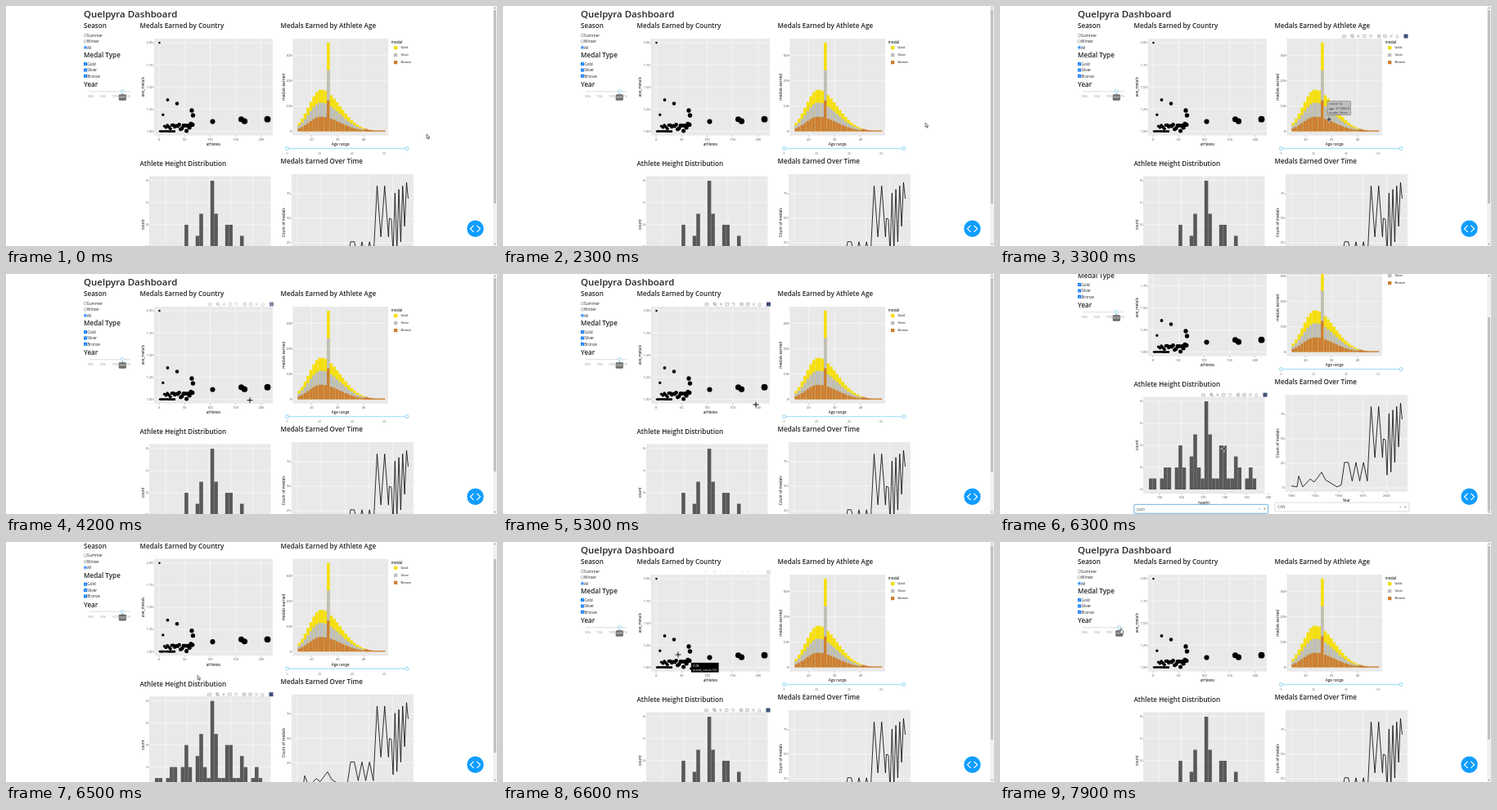
Recreate the animation shown at these times as an HTML page. Size 600 px wide and 294 px high, loop 8 s.

```html
<!DOCTYPE html>
<html lang="en">
<head>
<meta charset="utf-8">
<style>
  html, body { margin: 0; width: 100%; height: 100%; overflow: hidden; background: #fff; }
  svg { display: block; }
  text { font-family: "Open Sans", "Noto Sans", sans-serif; }
</style>
</head>
<body>
<svg id="stage" width="600" height="294" viewBox="0 0 600 294"></svg>
<script>
const LOOP = 8000, SCROLL = 58;
const stage = document.getElementById('stage');

function add(parent, name, attrs = {}) {
  const node = document.createElementNS('http://www.w3.org/2000/svg', name);
  for (const key in attrs) node.setAttribute(key, attrs[key]);
  parent.appendChild(node);
  return node;
}
const page = add(stage, 'g');
const group = (parent = page) => add(parent, 'g');
const rect = (x, y, width, height, fill, more = {}, parent = page) =>
  add(parent, 'rect', { x, y, width, height, fill, ...more });
const circle = (cx, cy, r, fill, more = {}, parent = page) =>
  add(parent, 'circle', { cx, cy, r, fill, ...more });
const path = (d, stroke, width, more = {}, parent = page) =>
  add(parent, 'path', { d, stroke, 'stroke-width': width, fill: 'none', ...more });
// y is the vertical middle of the capitals
function text(label, x, y, size, more = {}, parent = page) {
  const node = add(parent, 'text', { x, y: y + size * 0.36, 'font-size': size, fill: '#212529', ...more });
  node.textContent = label;
  return node;
}
const heading = (label, x, y, size = 8.15) => text(label, x, y, size, { 'font-weight': 600 });
const range = (count, make) => Array.from({ length: count }, (_, i) => make(i));

let seed = 7;
const random = () => (seed = seed * 16807 % 2147483647) / 2147483647;

// Sidebar
heading('Quelpyra Dashboard', 95, 9.5, 11.5);
heading('Season', 95, 24.5);
heading('Medal Type', 95, 60.5);
heading('Year', 95, 96);
['Summer', 'Winter', 'All'].forEach((label, i) => {
  const y = 36 + i * 7.4, on = label === 'All';
  circle(97, y, 1.8, '#fff', { stroke: on ? '#0075ff' : '#767676', 'stroke-width': 0.5 });
  if (on) circle(97, y, 1.1, '#0075ff');
  text(label, 99, y, 4.8);
});
['Gold', 'Silver', 'Bronze'].forEach((label, i) => {
  const y = 71 + i * 7.4;
  rect(95, y - 2, 4, 4, '#0075ff', { rx: 0.6 });
  path(`M95.9 ${y}l.8 .9 1.5-1.9`, '#fff', 0.6);
  text(label, 99.2, y, 4.8);
});
rect(101, 103.9, 51, 1.3, '#e4e4e4', { rx: 0.6 });
range(4, i => text(1896 + i * 40, 103 + i * 15, 111, 3.6, { fill: '#999', 'text-anchor': 'middle' }));
const yearKnob = group();
circle(0, 104.5, 1.9, '#fff', { stroke: '#74c9f3', 'stroke-width': 0.7 }, yearKnob);
path('M-1.2 108.4L0 107l1.2 1.4z', 'none', 0, { fill: '#6c6c6c' }, yearKnob);
rect(-4.6, 108.2, 9.2, 7.6, '#6c6c6c', { rx: 1.4 }, yearKnob);
const yearLabel = text('', 0, 112, 3.6, { fill: '#fff', 'text-anchor': 'middle' }, yearKnob);

// Chart frames; each tick is [label, position]
const panels = [];
function panel(x, y, w, h, xTicks, yTicks, xTitle, yTitle, yTitleX) {
  panels.push([x, y, w, h]);
  rect(x, y, w, h, '#e9e9e9');
  for (const [label, px] of xTicks) {
    path(`M${px} ${y}v${h}`, '#fff', 0.5);
    path(`M${px} ${y + h}v1.1`, '#333', 0.5);
    text(label, px, y + h + 4.6, 3.8, { fill: '#4d4d4d', 'text-anchor': 'middle' });
  }
  for (const [label, py] of yTicks) {
    path(`M${x} ${py}h${w}`, '#fff', 0.5);
    path(`M${x} ${py}h-1.1`, '#333', 0.5);
    text(label, x - 1.6, py, 3.8, { fill: '#4d4d4d', 'text-anchor': 'end' });
  }
  const title = { 'text-anchor': 'middle', fill: '#000' }, middle = y + h / 2;
  text(xTitle, x + w / 2, y + h + 11.2, 4.7, title);
  text(yTitle, yTitleX, middle, 4.7, { ...title, transform: `rotate(-90 ${yTitleX} ${middle})` });
}
const ticks = (count, value, position, valueStep, step, digits = 0) =>
  range(count, i => [(value + i * valueStep).toFixed(digits), position + i * step]);

// Scatter: a crowd near the origin plus the outliers, larger towards the right
heading('Medals Earned by Country', 163.5, 24.5);
panel(181, 40, 145, 118.6, ticks(5, 0, 187, 50, 31.2), ticks(5, 1, 153.5, 0.25, -27.1, 2),
  'athletes', 'ave_metals', 167);
const dot = (x, y) => circle(x, y, 1.1 + 2.8 * Math.sqrt((x - 187) / 132), '#000');
range(9, i => circle(188 + i * 2.2, 153.5, 1.3 + i * 0.04, '#000'));
range(22, i => dot(190 + i * 1.8, 153.5 - random() * (i < 4 ? 22 : 10)));
[[187.5, 45], [197.5, 115], [209, 119.5], [227, 128], [228.5, 134],
 [252.5, 141.5], [287.5, 138.7], [291.5, 141.2], [319.5, 138.7]].forEach(p => dot(...p));

// Stacked age histogram: a skewed bell with one spike
const GOLD = '#f5df0d', SILVER = '#bebebe', BRONZE = '#cd7f32';
heading('Medals Earned by Athlete Age', 335.5, 24.5);
panel(350.5, 40, 116.5, 118.6, ticks(3, 20, 373.5, 10, 31.7), ticks(4, 0, 153.5, 100, -31),
  'Age range', 'medals earned', 339.5);
range(30, i => {
  const spread = i < 7.5 ? 4.2 : 6.5;
  const h = i === 10 ? 108.5 : Math.max(1, 51 * Math.exp(-(((i - 7.5) / spread) ** 2) / 2));
  [[1, GOLD], [0.69, SILVER], [0.35, BRONZE]].forEach(([part, color]) =>
    rect(356.5 + i * 3.56, 153.5 - h * part, 3.6, h * part, i > 22 ? BRONZE : color));
});
text('medal', 470.5, 44.5, 4.8, { fill: '#000' });
[['Gold', GOLD], ['Silver', SILVER], ['Bronze', BRONZE]].forEach(([label, color], i) => {
  rect(474, 49 + i * 9, 4.4, 4.2, color);
  text(label, 482.5, 51 + i * 9, 3.8, { fill: '#000' });
});
rect(343, 173.9, 147, 1.3, '#abe2fb');
for (const x of [343.5, 490]) circle(x, 174.6, 2, '#fff', { stroke: '#74c9f3', 'stroke-width': 0.8 });
range(4, i => text(i * 20, 343.5 + i * 39.6, 181, 3.6, { fill: '#777', 'text-anchor': 'middle' }));

// Height histogram: a rippled bell with one tall bin
heading('Athlete Height Distribution', 163.5, 193.2);
panel(175, 208.5, 148.5, 118.6, ticks(6, 150, 195, 10, 26.6), ticks(5, 0, 322, 2, -27),
  'height', 'count', 167);
range(30, i => {
  const ripple = 3 + 2.6 * Math.cos((i - 8) / 3.8 * 2 * Math.PI);
  const n = i === 15 ? 8 : Math.round(ripple * Math.exp(-(((i - 15) / 11) ** 2)));
  rect(182 + i * 4.52, 322 - n * 13.5, 4.55, n * 13.5, '#595959');
});

// Medals over time: a low start, then a zigzag that jumps up and gets denser
heading('Medals Earned Over Time', 335.5, 190.3);
panel(349, 206, 149, 118.6, ticks(5, 1900, 356, 25, 29.1), ticks(4, 0, 320, 25, -30),
  'Year', 'Count of medals', 339);
const series = [
  [356, 2], [363, 1], [365, 12], [370, 1], [379, 9], [384, 6], [393, 16], [398, 8], [412, 1], [417, 3], [421, 26],
  ...range(10, i => [425.7 + i * 4.63, (i % 2 ? 7 : 26) + (i > 5 ? (i % 2 ? 24 : 57) : 0)]),
  [468.5, 50], [471, 49],
  ...range(8, i => [473 + i * 2.35, i % 2 ? 74 + i * 1.8 : 13 + i * i * 0.8]),
  [491.5, 70],
];
path('M' + series.map(([x, medals]) => `${x} ${320 - medals * 1.2}`).join('L'), '#000', 0.8,
  { 'stroke-linejoin': 'round' });

function dropdown(label, x, y, border) {
  rect(x, y, 164, 11, '#fff', { stroke: border, 'stroke-width': 0.7, rx: 1 });
  text(label, x + 3.5, y + 5.6, 4.6, { fill: '#555' });
  path(`M${x + 152.5} ${y + 4.4}l2 2m0-2l-2 2`, '#999', 0.5);
  path(`M${x + 158} ${y + 4.7}h3l-1.5 1.8z`, 'none', 0, { fill: '#888' });
}
dropdown('Judo', 163.8, 340.3, '#2f8fd0');
dropdown('CAN', 335.8, 338, '#ccc');

// Chart toolbars: small icons in groups, closed by a badge
const box = 'M-1.7-1.7h3.4v3.4h-3.4z';
const icons = [
  'M-2-1.2h4v2.8h-4zM-.6 .2h1.2', 'M-1.8-.4a1.5 1.5 0 1 0 3 0a1.5 1.5 0 1 0-3 0M.8.8l1.4 1.4',
  'M-2 0h4M0-2v4', box, 'M-1.8 0a1.9 1.5 0 1 1 1.8 1.4l-1 1',
  box + 'M-1 0h2M0-1v2', box + 'M-1 0h2', 'M-2-2l4 4M2-2l-4 4', 'M-2 .2l2-2 2 2M-1.3 .2v1.8h2.6v-1.8'];
function toolbar(x, y) {
  const bar = group();
  icons.forEach((d, i) => {
    const left = x + i * 7.4 + (i > 0) * 2.6 + (i > 4) * 3;
    path(d, i === 1 ? '#666' : '#aaa', 0.7, { transform: `translate(${left} ${y})` }, bar);
  });
  rect(x + 73, y - 2.5, 5, 5, '#3f4f75', {}, bar);
  return bar;
}
// each toolbar with its [shown, hidden] times
const toolbars = [
  [toolbar(249, 37), [[4000, 5500], [6550, 7100]]],
  [toolbar(420.5, 37), [[2800, 3900]]],
  [toolbar(248.5, 206), [[5700, 6600]]],
];

function hoverLabel(x, y, w, lines, fill, ink) {
  const label = group();
  rect(x, y, w, lines.length * 5.2 + 1.2, fill, { stroke: '#444', 'stroke-width': 0.4 }, label);
  path(`M${x} ${y + 5}l-2.5 2 2.5 2z`, 'none', 0, { fill }, label);
  lines.forEach((line, i) => text(line, x + 1.8, y + 3.2 + i * 5.2, 3.9, { fill: ink }, label));
  return label;
}
const hoverLabels = [
  [hoverLabel(400, 116.8, 28.5, ['count: 52', 'age: 27.59823', 'medal: Silver'], SILVER, '#333'), 3200, 3500],
  [hoverLabel(230, 148, 33.5, ['CUB', 'metal_count: 64'], '#000', '#fff'), 6600, 6700],
];

// Fixed overlay
rect(595, 0, 5, 294, '#f1f1f1', {}, stage);
path('M596.3 3l1.2-1.5 1.2 1.5zM596.3 291l1.2 1.5 1.2-1.5z', 'none', 0, { fill: '#777' }, stage);
const thumb = rect(596, 5, 3, 237, '#c1c1c1', {}, stage);
circle(573.5, 272.8, 10.2, '#119dff', {}, stage);
path('M571.5 268.8l-4 4 4 4M575.5 268.8l4 4-4 4', '#fff', 1.2, {}, stage);

const cursors = { arrow: group(stage), cross: group(stage), hand: group(stage) };
path('M0 0v5.2l1.3-1.1 .9 2 .9-.4-.9-1.9h1.7z', '#222', 0.6, { fill: '#fff' }, cursors.arrow);
path('M-4 0h8M0-4v8', '#fff', 2, {}, cursors.cross);
path('M-3.5 0h7M0-3.5v7', '#000', 1, {}, cursors.cross);
path('M-.5 0h1v2l2.2.6v2.2l-.8 1.2h-2.4l-1.6-2.4 .7-.5 .9.7z', '#222', 0.5, { fill: '#fff' }, cursors.hand);

// Key poses: time, then values
const pointer = [
  [0, 514, 157], [700, 516, 144], [2600, 516, 143], [3300, 402, 139], [3800, 370, 172], [4400, 262, 146],
  [5000, 304, 146], [5300, 309, 160], [6000, 276, 212], [6300, 274, 214], [6600, 214, 138],
  [7400, 142, 105], [7500, 142, 105], [7800, 148, 106]];
const scrolling = [[0, 0], [5400, 0], [5700, SCROLL], [6300, SCROLL], [6600, 0]];
const knob = [[0, 142.3], [7500, 142.3], [7900, 145.8]];

function at(keys, t, field = 1) {
  const next = keys.findIndex(k => k[0] > t);
  if (next < 0) return keys[keys.length - 1][field];
  const a = keys[next - 1], b = keys[next];
  return a[field] + (b[field] - a[field]) * (t - a[0]) / (b[0] - a[0]);
}
const clamp = v => Math.max(0, Math.min(1, v));
const move = (node, x, y) => node.setAttribute('transform', `translate(${x} ${y})`);
const show = (node, on) => node.setAttribute('visibility', on ? 'visible' : 'hidden');

function draw() {
  const t = Math.floor(performance.now() % LOOP / 100) * 100;   // ten steps a second
  const scroll = at(scrolling, t), x = at(pointer, t), y = at(pointer, t, 2);
  move(page, 0, -scroll);
  thumb.setAttribute('y', 5 + scroll * 0.83);

  const knobX = at(knob, t);
  move(yearKnob, knobX, 0);
  yearLabel.textContent = 2000 + Math.round((knobX - 142.3) * 1.33) * 2;

  for (const [bar, spans] of toolbars)
    bar.setAttribute('opacity', Math.max(...spans.map(([from, to]) =>
      Math.min(clamp((t - from) / 300), clamp((to + 300 - t) / 300)))));
  for (const [label, from, to] of hoverLabels) show(label, t >= from && t < to);

  const inPanel = panels.some(([px, py, w, h]) =>
    x > px && x < px + w && y + scroll > py && y + scroll < py + h + 3);
  const shown = inPanel ? 'cross' : t >= 7300 ? 'hand' : 'arrow';
  for (const kind in cursors) {
    move(cursors[kind], x, y);
    show(cursors[kind], kind === shown);
  }
  requestAnimationFrame(draw);
}
draw();
</script>
</body>
</html>
```
